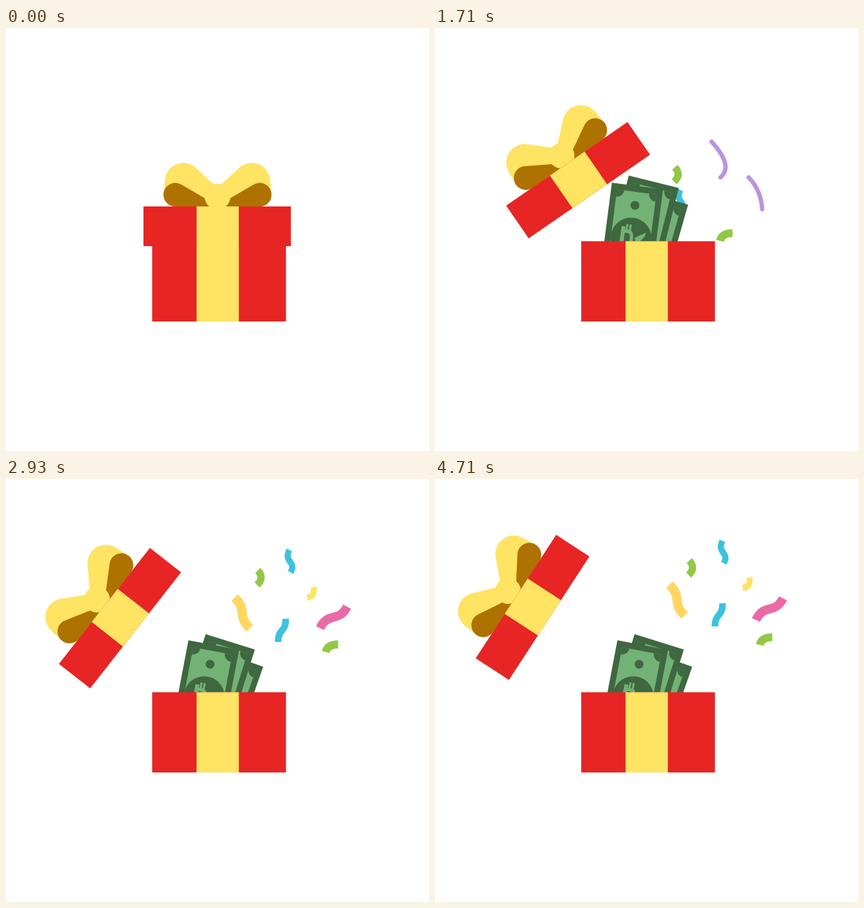
Write an HTML page with a canvas that moves like this. It is 640 px wide and 640 px high and loops after 5.71 s.

```html
<!DOCTYPE html>
<html lang="en">
<head>
<meta charset="utf-8">
<title>Gift box</title>
<style>
  html, body { margin: 0; height: 100%; overflow: hidden; background: #fff; }
  canvas { display: block; width: 100vw; height: 100vh; }
</style>
</head>
<body>
<canvas width="640" height="640"></canvas>
<script>
const ctx = document.querySelector('canvas').getContext('2d');
const LOOP = 5710, FPS = 14;
const RED = '#e72524', YELLOW = '#ffe363', BROWN = '#ad7200';
const DARK = '#3f6740', LIGHT = '#73b277', PURPLE = '#bd94dd';
const GREEN = '#92c846', BLUE = '#3bc2de', PINK = '#ea6aa6', ORANGE = '#ffd65f';

const clamp = u => Math.min(1, Math.max(0, u));
const mix = (a, b, u) => a + (b - a) * u;

// Smooth rise from 0 to 1; all times are in animation steps.
function ease(n, start, span = 7) {
  const u = clamp((n - start) / span);
  return u * u * (3 - 2 * u);
}

function rect(color, x, y, w, h) {
  ctx.fillStyle = color;
  ctx.fillRect(x, y, w, h);
}

function shape(color, d) {
  ctx.fillStyle = color;
  ctx.fill(new Path2D(d));
}

function dot(color, x, y, r) {
  ctx.fillStyle = color;
  ctx.beginPath();
  ctx.arc(x, y, r, 0, 7);
  ctx.fill();
}

function line(color, width, d) {
  ctx.strokeStyle = color;
  ctx.lineWidth = width;
  ctx.stroke(new Path2D(d));
}

function place(x, y, degrees, draw) {
  ctx.save();
  ctx.translate(x, y);
  ctx.rotate(degrees * Math.PI / 180);
  draw();
  ctx.restore();
}

// Each piece shoots out of the box at its launch step, then glides to rest at x, y.
// dx, dy is the way still to go at step 31; it shrinks exponentially.
const confetti = [
  { color: GREEN, width: 11, path: 'M-3,-10.3Q7.5,.5 -4,11.5', x: 388, y: 132.5, dx: 11, dy: 44, launch: 17 },
  { color: GREEN, width: 11.8, path: 'M-7,8Q-4,-3.5 12,-3.5', x: 499, y: 242, dx: 23, dy: 32, launch: 18.5 },
  { color: BLUE, width: 9.3, path: 'M-.5,-17C-10,2 11,0 1.5,17', x: 436, y: 109.3, dx: 18.5, dy: 41, launch: 20 },
  { color: BLUE, width: 10, path: 'M6,-17.5C7,3 -5.5,-3 -5.5,17.5', x: 430, y: 203.5, dx: 35, dy: 69, launch: 23 },
  { color: YELLOW, width: 9, path: 'M4,-9.5C4.5,3 1,5 -6.5,6.5', x: 473, y: 157.2, dx: 30, dy: 43, launch: 23 },
  { color: PINK, width: 13.5, path: 'M-20.5,16.5C-8,-9 8,9 20.5,-16', x: 507, y: 195.5, dx: 31, dy: 37, launch: 23 },
  { color: ORANGE, width: 14, path: 'M-11.5,-23C9,-4 -9,4 11.5,23', x: 367, y: 181.3, dx: 26, dy: 58, launch: 23 }
];

function drawConfetti({ color, width, path, x, y, dx, dy, launch }, n) {
  if (n <= launch) return;
  const out = ease(n, launch), left = Math.exp((31 - n) / 10);
  const px = mix(330, x - dx * left, out), py = mix(370, y + dy * left, out);
  place(px, py, 0, () => line(color, width, path));
}

function bill() {
  rect(DARK, 0, 0, 78, 115);
  rect(LIGHT, 9, 9, 60, 106);
  shape(DARK, 'M9,9h11a11,11 0 0 1 -11,11zM69,9h-11a11,11 0 0 0 11,11z');
  dot(DARK, 39, 29.5, 6.7);
}

function money() {
  place(41.5, 6.5, 8.5, bill);
  place(23.8, -14, 6.5, bill);
  bill();
  dot(DARK, 39.5, 79.5, 31);
  shape(LIGHT, 'M23,63h6v33h-6zM30,59h3v12h-3zM35,59h3v12h-3zM45,78L61,68L60,74L48,90z');
  line(LIGHT, 5, 'M28,70H35Q40,71 40,78V96');
}

// The bills pop up past their resting height and sway about their base.
function drawMoney(n) {
  const hop = 14 * Math.sin(Math.PI * clamp((n - 17) / 14));
  const rise = 42 * (1 - ease(n, 16));
  const fade = Math.max(0, (41 - n) / 17);
  const sway = -3.4 * fade * Math.cos(Math.PI * (n - 24) / 7);
  place(341, 387 + rise - hop, sway, () => place(-65, -143, 10.8, money));
}

function drawBox() {
  rect(RED, 221.2, 322.6, 202.4, 121.4);
  rect(YELLOW, 288.3, 322.6, 64, 121.4);
}

function bowHalf() {
  shape(YELLOW, 'M238.5,252L240.4,229A28,28 0 0 1 288,212.3L314,236.5L322,258L300,264L257,253z');
  shape(BROWN, 'M266,237.2A18,18 0 1 0 256.5,270.3H310V263z');
}

function lid() {
  bowHalf();
  ctx.save();
  ctx.translate(640, 0);
  ctx.scale(-1, 1);
  bowHalf();
  ctx.restore();
  dot(YELLOW, 320, 255.3, 19.5);
  rect(RED, 208, 270, 223, 60);
  rect(YELLOW, 288.4, 270, 63.8, 60);
}

// The lid crouches, bursts off the box, then drifts on and slows to a stop at step 59.
function drawLid(n) {
  const crouch = 0.05 * Math.sin(Math.PI * clamp((n - 6) / 10));
  const burst = ease(n, 16), left = Math.max(0, 59 - n) / 18;
  const x = 147.6 + 24.9 * left ** 1.53;
  const y = 194.3 + left ** 1.5 * (19.1 - 3 * left);
  const angle = -56.9 + 5 * left ** 2.25;
  place(mix(319.5, x, burst), mix(300, y, burst), angle * burst, () => {
    ctx.translate(0, 30);
    ctx.scale(1, 1 - crouch);
    ctx.translate(-319.5, -330);
    lid();
  });
}

// Bezier points of each motion arc, before and after it slides outwards.
const arcs = [
  { start: 10, from: [447.5, 223, 474, 247, 482, 282, 456.5, 304], to: [474.5, 226, 486, 238, 494, 255, 495, 274] },
  { start: 16, to: [418.5, 172, 434, 189, 449, 211, 432, 226] }
];

function drawArc({ start, to, from = to }, n) {
  const shown = ease(n, start, 5) - ease(n, 24, 4);
  if (shown <= 0) return;
  const [x, y, ...rest] = to.map((end, i) => mix(from[i], end, ease(n, 15)));
  ctx.lineCap = 'round';
  ctx.setLineDash([100 * shown, 999]);
  line(PURPLE, 6.5, `M${x},${y}C${rest}`);
  ctx.setLineDash([]);
  ctx.lineCap = 'butt';
}

function draw(n) {
  rect('#fff', 0, 0, 640, 640);
  confetti.forEach(piece => drawConfetti(piece, n));
  if (n > 15) drawMoney(n);
  drawBox();
  arcs.forEach(arc => drawArc(arc, n));
  drawLid(n);
}

function tick(now) {
  draw(Math.floor(now % LOOP * FPS / 1000 + 0.1));
  requestAnimationFrame(tick);
}
requestAnimationFrame(tick);
</script>
</body>
</html>
```
